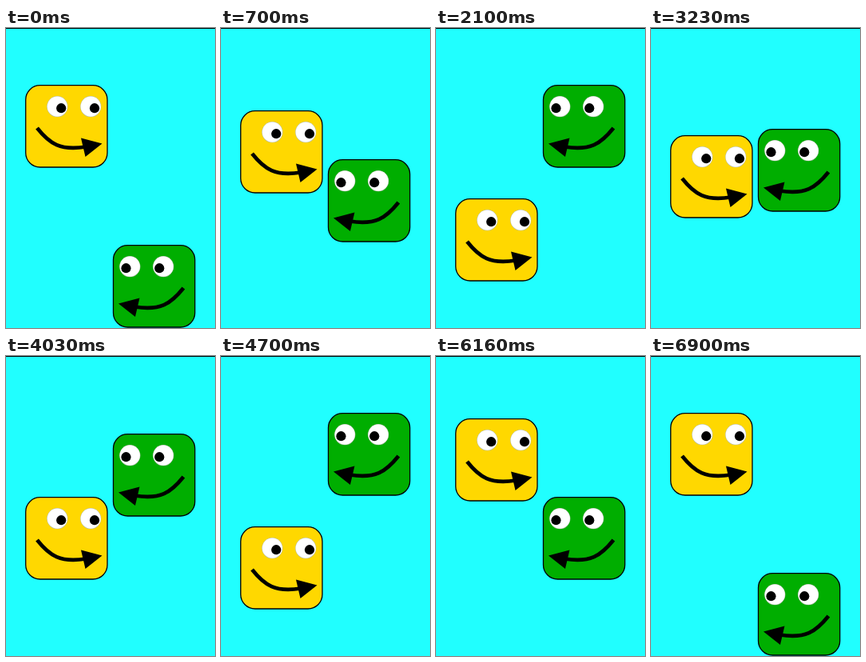
These frames come from a looping animation (262x375 px, 6930 ms). An HTML page with a canvas:

```html
<!DOCTYPE html>
<html lang="en">
<head>
<meta charset="utf-8">
<title>Bouncing faces</title>
<style>
html, body { margin: 0; width: 100%; height: 100%; overflow: hidden; background: #20ffff; }
canvas { display: block; }
</style>
</head>
<body>
<canvas id="stage" width="262" height="375"></canvas>
<script>
const ctx = document.getElementById('stage').getContext('2d');
const LOOP = 6930, STEP = 1000 / 15, PERIOD = 13;
const TOP = 69, GRAVITY = 4.98;

// Height of a bouncing box: a parabola around its highest moment.
function bounce(step, apex) {
  const p = (step - apex + PERIOD) % PERIOD;
  const d = Math.min(p, PERIOD - p);
  return Math.round(TOP + GRAVITY * d * d);
}

function disc(x, y, r, fill) {
  ctx.beginPath();
  ctx.arc(x, y, r, 0, Math.PI * 2);
  ctx.fillStyle = fill;
  ctx.fill();
}

function eye(x, pupilX) {
  disc(x, 27.2, 13.1, '#b4bcae');
  disc(x, 27.2, 12.6, '#fff');
  disc(pupilX, 29.2, 6.1, '#000');
}

function face(x, y, dir, color) {
  ctx.save();
  ctx.translate(x, y);
  ctx.scale(dir, 1);

  ctx.beginPath();
  ctx.roundRect(0.7, 0.7, 102.3, 102.3, 18);
  ctx.fillStyle = color;
  ctx.fill();
  ctx.strokeStyle = '#000';
  ctx.lineWidth = 1.3;
  ctx.stroke();

  eye(40.3, 45.2);
  eye(82.2, 87);

  ctx.beginPath();
  ctx.moveTo(15, 54);
  ctx.bezierCurveTo(31, 74, 44, 82.5, 76, 77.5);
  ctx.lineWidth = 4.8;
  ctx.stroke();

  ctx.beginPath();
  ctx.moveTo(96.5, 73.5);
  ctx.lineTo(70, 66.5);
  ctx.lineTo(75.5, 90);
  ctx.closePath();
  ctx.fillStyle = '#000';
  ctx.fill();
  ctx.restore();
}

function draw(ms) {
  const t = Math.floor(ms / 10) * 10 + 7;
  const step = Math.floor(t / STEP + 0.5) % PERIOD;
  ctx.fillStyle = '#20ffff';
  ctx.fillRect(0, 0, 262, 375);
  ctx.fillStyle = '#000';
  ctx.fillRect(0, 0, 262, 1);
  face(24, bounce(step, 0.625), 1, '#ffd800');
  face(237.5, bounce(step, 6.625), -1, '#00ae00');
}

const start = performance.now();
function tick() {
  draw((performance.now() - start) % LOOP);
  requestAnimationFrame(tick);
}
tick();
</script>
</body>
</html>
```
